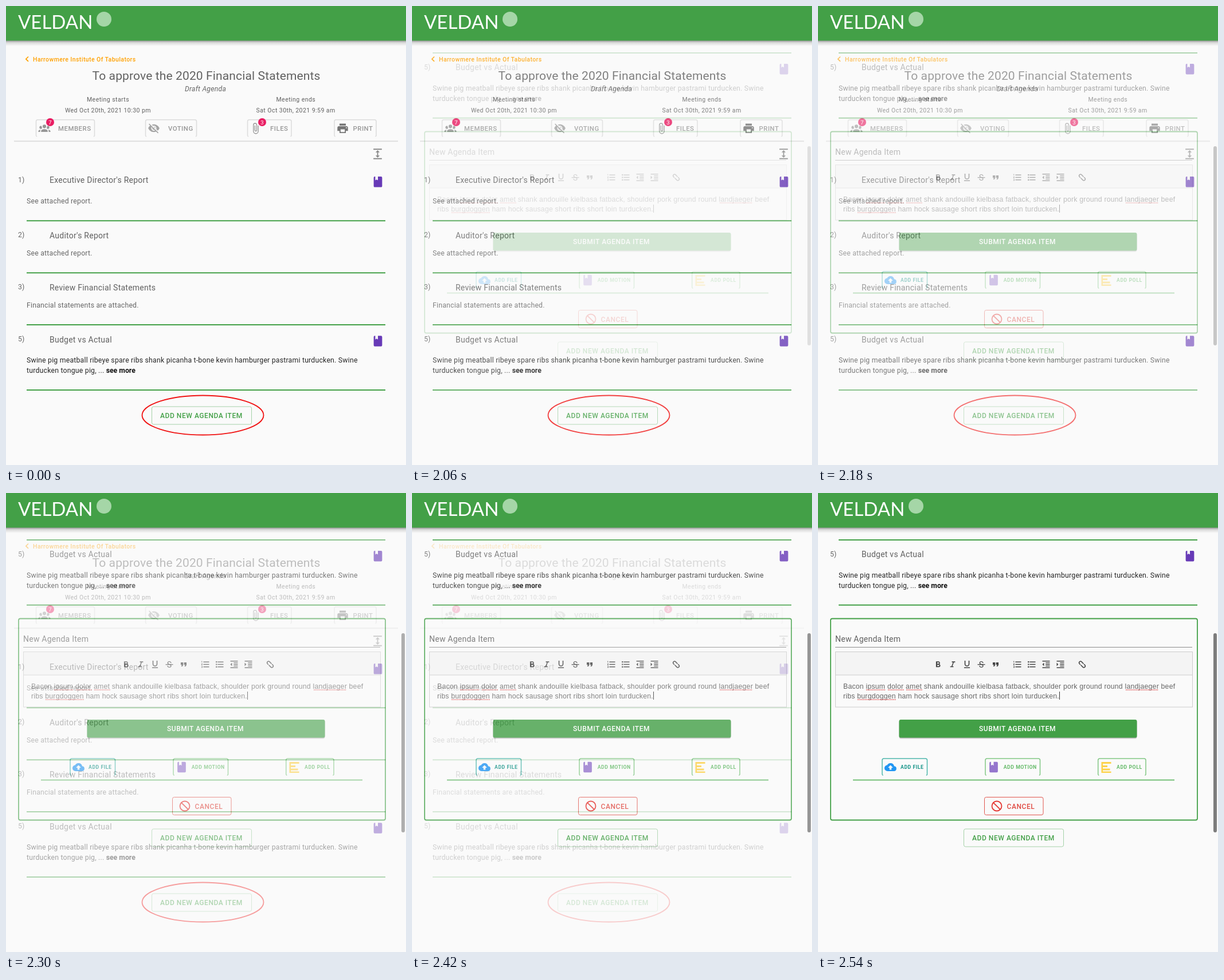
An HTML page that plays this animation: 698 px wide and 802 px high, repeating every 4.54 s.

```html
<!DOCTYPE html>
<html lang="en">
<head>
<meta charset="utf-8">
<title>Meeting agenda</title>
<style>
html, body { margin: 0; width: 100%; height: 100%; overflow: hidden; background: #fafafa; }
svg { display: block; width: 698px; height: 802px; font-family: Roboto, sans-serif; }
text { white-space: pre; }
.title { font-size: 21px; letter-spacing: .13px; fill: #616161; }
.head { font-size: 14px; letter-spacing: .24px; fill: #616161; }
.body { font-size: 12.25px; letter-spacing: .219px; fill: #666; }
.dark { fill: #262626; }
.small { font-size: 10.5px; letter-spacing: .45px; fill: #606060; }
.crumb { font-size: 10.5px; letter-spacing: .42px; font-weight: 500; fill: #ffa000; }
.tab { font-size: 11.4px; letter-spacing: .5px; font-weight: 500; fill: #979797; }
.btn { font-size: 12px; letter-spacing: .55px; font-weight: 500; fill: #43a047; }
.mini { font-size: 8.75px; letter-spacing: .5px; font-weight: 700; fill: #66bb6a; }
.edit { font: 12.25px "Liberation Sans", Arial, sans-serif; letter-spacing: .225px; fill: #666; }
.badge { font-size: 9.5px; fill: #fff; text-anchor: middle; }
.logo { font: 33px Lato, sans-serif; fill: #fff; }
</style>
</head>
<body>
<svg id="stage" viewBox="0 0 698 802"></svg>
<script>
const GREEN = '#43a047', LEAF = '#66bb6a', GREY = '#979797', INK = '#444';

const icons = {
  book: 'M18 22a2 2 0 0 0 2-2V4a2 2 0 0 0-2-2h-6v7L9.500 7.500 7 9V2H6a2 2 0 0 0-2 2v16a2 2 0 0 0 2 2z',
  people: 'M12 5.500a3.500 3.500 0 0 1 0 7 3.500 3.500 0 0 1 0-7zM5 8q.9 0 1.500.4-.2 2.300 1.200 4A3 3 0 1 1 5 8zM19 8q-.9 0-1.500.4.2 2.300-1.200 4A3 3 0 1 0 19 8zM5.500 20v-1.700c0-5 13-5 13 0V20zM0 20v-1.500q0-2.300 4.500-2.900-1 1.200-1 2.700V20zM24 20v-1.500q0-2.300-4.500-2.900 1 1.200 1 2.700V20z',
  hidden: 'M11.830 9 15 12.160V12a3 3 0 0 0-3.170-3M7.530 9.800l1.550 1.550A3 3 0 0 0 12.650 14.920l1.550 1.550A5 5 0 0 1 7.530 9.800M2 4.270 4.730 7A11.800 11.800 0 0 0 1 12a11.800 11.800 0 0 0 15.380 6.660L19.730 22 21 20.730 3.270 3M12 7a5 5 0 0 1 4.640 6.820l2.930 2.930A11.800 11.800 0 0 0 23 12 11.800 11.800 0 0 0 8 5.200l2.170 2.150A5 5 0 0 1 12 7z',
  clip: 'M16.500 6v11.500a4 4 0 0 1-8 0V5a2.500 2.500 0 0 1 5 0v10.500a1 1 0 0 1-2 0V6H10v9.500a2.500 2.500 0 0 0 5 0V5a4 4 0 0 0-8 0v12.500a5.500 5.500 0 0 0 11 0V6z',
  printer: 'M18 3H6v4h12zM19 12a1 1 0 1 1 0-2 1 1 0 0 1 0 2M16 19H8v-5h8zM19 8H5a3 3 0 0 0-3 3v6h4v4h12v-4h4v-6a3 3 0 0 0-3-3z',
  cloud: 'M14 13v4h-4v-4H7l5-5 5 5zM19.350 10.030A7.500 7.500 0 0 0 5.350 8.030 6 6 0 0 0 6 20h13a5 5 0 0 0 .35-9.970z',
  spread: 'M4 2h16v2H4zM4 20h16v2H4zM13 9v6h3l-4 4-4-4h3V9H8l4-4 4 4z',
  bold: 'M13.500 15.500H10v-3h3.500a1.500 1.500 0 0 1 0 3M10 6.500h3a1.500 1.500 0 0 1 0 3h-3zM15.600 10.800A4 4 0 0 0 13.250 4H7v14h7a3.800 3.800 0 0 0 1.600-7.200z',
  italic: 'M10 4v2.300h2.600L9.200 15.700H6V18h8v-2.300h-2.600l3.400-9.400H18V4z',
  under: 'M5 21h14v-2H5zM12 17a6 6 0 0 0 6-6V3h-2.300v8a3.700 3.700 0 0 1-7.400 0V3H6v8a6 6 0 0 0 6 6z',
  quote: 'M14 17h3l2-4V7h-6v6h3zM6 17h3l2-4V7H5v6h3z',
  numbers: 'M7 5h14v2H7zM7 11h14v2H7zM7 17h14v2H7zM2 4h2v4H3V5H2zM2 10h3v1l-2 2h2v1H2v-1l2-2H2zM2 16h3v4H2v-1h2v-.5H3v-1h1V17H2z',
  bullets: 'M7 5h14v2H7zM7 11h14v2H7zM7 17h14v2H7zM2.500 4.500h3v3h-3zM2.500 10.500h3v3h-3zM2.500 16.500h3v3h-3z',
  outdent: 'M3 3h18v2H3zM11 7h10v2H11zM11 11h10v2H11zM11 15h10v2H11zM3 19h18v2H3zM7 8v8l-4-4z',
  indent: 'M3 3h18v2H3zM11 7h10v2H11zM11 11h10v2H11zM11 15h10v2H11zM3 19h18v2H3zM3 8v8l4-4z'
};

const text = (cls, x, y, s, extra = '') => `<text class="${cls}" x="${x}" y="${y}" ${extra}>${s}</text>`;
const fill = c => `style="fill:${c}"`;
const icon = (name, cx, cy, k, color) =>
  `<path fill="${color}" fill-rule="evenodd" transform="translate(${cx} ${cy}) scale(${k}) translate(-12 -12)" d="${icons[name]}"/>`;
const line = (x1, x2, y, color = GREEN, w = 2) =>
  `<path d="M${x1} ${y}H${x2}" stroke="${color}" stroke-width="${w}"/>`;
const box = (x, y, w, h, stroke, sw = 1, bg = 'none', r = 3) =>
  `<rect x="${x}" y="${y}" width="${w}" height="${h}" rx="${r}" fill="${bg}" stroke="${stroke}" stroke-width="${sw}"/>`;
// Outline whose lower edge is cut off
const tab = (x, right, y, color) =>
  `<path d="M${x} ${y + 28}V${y + 3}q0-3 3-3H${right - 3}q3 0 3 3V${y + 28}l-1.500 1.500M${x} ${y + 28}l1.500 1.500" fill="none" stroke="${color}" stroke-width="1.500"/>`;
const book = (y, x = 649, color = '#673ab7') => icon('book', x, y, .92, color);
const badge = (x, n) => `<circle cx="${x}" cy="203" r="7" fill="#e91e63"/>` + text('badge', x, 206.500, n);
const addNew = y => box(254.500, y, 174, 31, '#a5d1a8') + text('btn', 269, y + 20.300, 'ADD NEW AGENDA ITEM');

// One agenda entry; y is the middle of its heading
const item = (y, n, title) => text('body', 21, y + 3.500, n + ')') + text('head', 76, y + 5, title);
const note = (y, s) => text('body', 36, y, s);
const budget = y => item(y, 5, 'Budget vs Actual') + book(y + 3) +
  text('body dark', 36, y + 40.500, 'Swine pig meatball ribeye spare ribs shank picanha t-bone kevin hamburger pastrami turducken. Swine') +
  text('body dark', 36, y + 58.300, 'turducken tongue pig, ... <tspan font-weight="700" fill="#111" letter-spacing="0">see more</tspan>') +
  line(36, 662, y + 88.500);

const agenda = () =>
  '<path d="M39 88.500l-4.200 4.200 4.200 4.200" fill="none" stroke="#ffa000" stroke-width="1.700"/>' +
  text('crumb', 47, 96.500, 'Harrowmere Institute Of Tabulators') +
  text('title', 349.500, 128.500, 'To approve the 2020 Financial Statements', 'text-anchor="middle"') +
  text('body', 312, 149, 'Draft Agenda', 'font-style="italic"') +
  text('small', 141, 167, 'Meeting starts') + text('small', 103, 185.700, 'Wed Oct 20th, 2021 10:30 pm') +
  text('small', 471.500, 167, 'Meeting ends') + text('small', 436.500, 185.700, 'Sat Oct 30th, 2021 9:59 am') +
  [[52.500, 154.500, 91, 'MEMBERS'], [243.500, 332.500, 283, 'VOTING'], [421.500, 498, 461, 'FILES'], [573, 646, 605.500, 'PRINT']]
    .map(([a, b, x, s]) => tab(a, b, 198.700, '#dcdcdc') + text('tab', x, 217.500, s)).join('') +
  icon('people', 67, 213, .88, GREY) + icon('hidden', 258, 213.500, .9, '#a5a5a5') +
  icon('clip', 435.500, 214, .88, GREY) + icon('printer', 587.500, 213.700, .92, '#757575') +
  badge(77, 7) + badge(447, 3) + line(14, 684, 236.300, '#dedede') +
  icon('spread', 648.500, 258.500, .92, '#8a8a8a') +
  item(304, 1, "Executive Director's Report") + book(307.300) + note(345, 'See attached report.') + line(36, 662, 375.300) +
  item(400.500, 2, "Auditor's Report") + note(436, 'See attached report.') + line(36, 662, 466.200) +
  item(491.500, 3, 'Review Financial Statements') + note(527, 'Financial statements are attached.') + line(36, 662, 557) +
  budget(582.500) + addNew(700) +
  '<ellipse cx="343.500" cy="715" rx="106" ry="34.500" fill="none" stroke="#f01414" stroke-width="1.800"/>';

const toolbar = () =>
  [['bold', 209.500], ['italic', 235], ['under', 260], ['quote', 310], ['numbers', 348], ['bullets', 373], ['outdent', 398], ['indent', 423]]
    .map(([n, x]) => icon(n, x, n === 'bold' || n === 'italic' ? 300 : 299.500, .72, INK)).join('') +
  text('head', 280.700, 304.500, 'S', fill(INK)) + line(278.500, 291.500, 299.700, INK, 1.300) +
  `<g transform="translate(461 299.500) rotate(45)" fill="none" stroke="${INK}" stroke-width="1.500">` +
  '<path d="M1 -2.500H-4a2.500 2.500 0 0 0 0 5h2M-1 2.500H4a2.500 2.500 0 0 0 0-5h-2"/></g>';

const typo = (x1, x2, y) =>
  `<path d="M${x1} ${y}H${x2}" stroke="#e05a5a" stroke-width="1.600" stroke-dasharray="1.600 1"/>`;

const form = () =>
  line(36, 662, 82) + budget(107.200) +
  box(22, 219.500, 640, 352, GREEN, 1.800) +
  text('head', 30, 260.300, 'New Agenda Item') + line(30, 653, 269.500, '#8c8c8c', 1) +
  box(30.500, 277.500, 623, 96.500, '#ccc', 1, 'none', 0) + box(30.500, 277.500, 623, 40.500, '#ccc', 1, '#f4f4f4', 0) +
  toolbar() +
  text('edit', 44, 341.500, 'Bacon ipsum dolor amet shank andouille kielbasa fatback, shoulder pork ground round landjaeger beef') +
  text('edit', 44, 358.500, 'ribs burgdoggen ham hock sausage short ribs short loin turducken.') +
  [[84, 118], [122, 150], [154, 182], [537, 594]].map(([a, b]) => typo(a, b, 344)).join('') + typo(69, 136, 361) +
  '<path d="M421.500 347V361" stroke="#333"/>' +
  box(141.500, 398, 415, 31.500, 'none', 0, 'rgba(0,0,0,.12)') + box(141.500, 397, 415, 31.500, 'none', 0, 'rgba(0,0,0,.2)') +
  box(141.500, 396, 415, 31.500, 'none', 0, GREEN) +
  text('btn', 281, 416.300, 'SUBMIT AGENDA ITEM', fill('#fff')) +
  tab(112, 190.500, 464, '#4db6ac') + icon('cloud', 126.500, 479, .875, '#2196f3') + text('mini', 144, 482.200, 'ADD FILE', fill('#159488')) +
  tab(292, 387.500, 464, '#81c784') + book(479, 306.500, '#9575cd') + text('mini', 323.700, 482.200, 'ADD MOTION') +
  tab(488.700, 572, 464, '#81c784') + text('mini', 521, 482.200, 'ADD POLL') +
  '<path d="M494.500 470H511.500V473H497V476H505V479H497V481.500H509.500V484.500H497V486.500H511.500V489H494.500z" fill="#fdd24a"/>' +
  line(61, 622, 501.500, '#74c078') +
  box(290.500, 531.500, 102.500, 31, '#e0554d') +
  '<path d="M305.800 540.800l12.400 12.400" stroke="#e53935" stroke-width="1.800"/><circle cx="312" cy="547" r="8.500" fill="none" stroke="#e53935" stroke-width="1.800"/>' +
  text('btn', 329.500, 551.500, 'CANCEL', fill('#e04a42')) +
  addNew(587) + box(690, 245, 6, 348, 'none', 0, '#7d7d7d');

const header =
  '<rect y="60" width="698" height="10" fill="url(#shade)"/>' +
  `<rect width="698" height="60.500" fill="${GREEN}"/>` +
  text('logo', 21, 40, 'VELDAN') + '<circle cx="171" cy="23" r="13" fill="#a5d6a7"/>';

const page = '<rect width="698" height="802" fill="#fafafa"/>';
document.getElementById('stage').innerHTML =
  '<defs><linearGradient id="shade" x2="0" y2="1"><stop stop-opacity=".42"/><stop offset=".4" stop-opacity=".13"/><stop offset="1" stop-opacity="0"/></linearGradient></defs>' +
  page + agenda() + `<g id="form">${page + form()}</g>` + header;

const LOOP = 4540, HOLD = 2000, STEP = 60;
const layer = document.getElementById('form');

// Cross-fade in tenths, one every 60 ms
function draw(ms) {
  const t = ms % LOOP;
  const mix = t < HOLD ? 0 : Math.min(1, (Math.floor((t - HOLD) / STEP) + 1) / 10);
  layer.setAttribute('opacity', mix);
}

const start = performance.now();
function tick() {
  draw(performance.now() - start);
  requestAnimationFrame(tick);
}
tick();
</script>
</body>
</html>
```
